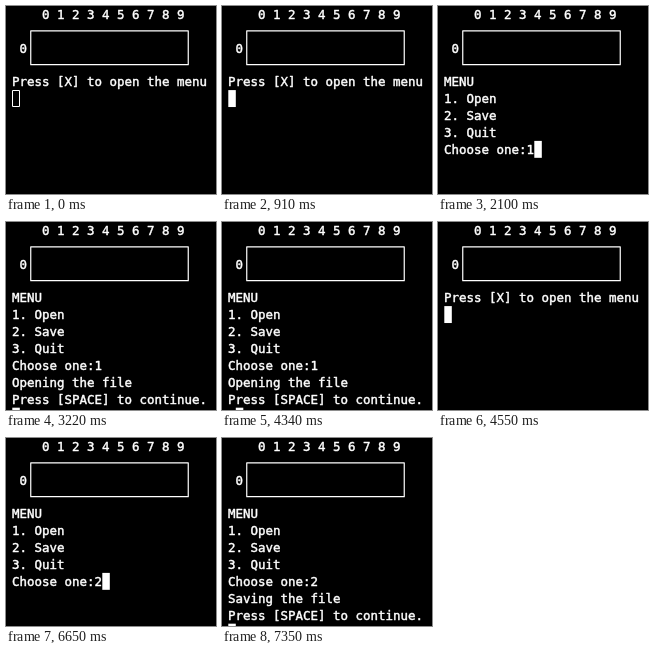
An HTML page with a canvas for the animation above (8000 ms loop, 210x188 px).

```html
<!DOCTYPE html>
<html lang="en">
<head>
<meta charset="utf-8">
<title>Terminal menu</title>
<style>
  html, body { margin: 0; width: 100%; height: 100%; overflow: hidden; background: #000; }
  canvas { display: block; width: 210px; height: 188px; }
</style>
</head>
<body>
<canvas id="stage" width="210" height="188"></canvas>
<script>
const ctx = document.getElementById('stage').getContext('2d');
const LOOP = 8000;
const LEFT = 6, TOP = -0.55, CELL = 7.5, LINE = 16.93, BASE = 13.2;
const FIRST_ROW = 4;

const prompt = ['Press [X] to open the menu', ''];
const menu = choice => ['MENU', '1. Open', '2. Save', '3. Quit', 'Choose one:' + choice];
const result = (choice, message, typed = '') =>
  [...menu(choice), message, 'Press [SPACE] to continue.', typed];

// The cursor sits after the last line; it is hollow while the window is unfocused.
const steps = [
  { at: 0, lines: prompt, hollow: true },
  { at: 490, lines: prompt },
  { at: 840, lines: prompt, hollow: true },
  { at: 910, lines: prompt },
  { at: 980, lines: menu('') },
  { at: 2100, lines: menu('1') },
  { at: 3220, lines: result('1', 'Opening the file') },
  { at: 4340, lines: result('1', 'Opening the file', ' ') },
  { at: 4550, lines: prompt },
  { at: 6020, lines: menu('') },
  { at: 6650, lines: menu('2') },
  { at: 7350, lines: result('2', 'Saving the file') }
];

const colX = col => LEFT + col * CELL;
const rowY = row => TOP + row * LINE;

// A thin outline gives the heavier stems of a smoothed terminal font.
function print(text, col, row) {
  const x = colX(col), y = Math.round(rowY(row) + BASE);
  ctx.lineWidth = 0.45;
  ctx.fillText(text, x, y);
  ctx.strokeText(text, x, y);
}

function drawTable() {
  print('0 1 2 3 4 5 6 7 8 9', 4, 0);
  print('0', 1, 2);
  ctx.lineWidth = 1.2;
  ctx.strokeRect(colX(2.5), rowY(1.5), 21 * CELL, 2 * LINE);
}

function drawCursor(col, row, hollow) {
  const x = colX(col), y = rowY(row);
  if (hollow) {
    ctx.lineWidth = 1;
    ctx.strokeRect(Math.floor(x) + 0.5, Math.floor(y) + 0.5, 7, 16);
  } else {
    ctx.fillRect(x + 0.3, y, CELL, LINE);
  }
}

function draw(now) {
  const time = now % LOOP;
  const { lines, hollow } = steps.findLast(step => step.at <= time);
  ctx.fillStyle = '#000';
  ctx.fillRect(0, 0, 210, 188);
  ctx.fillStyle = ctx.strokeStyle = '#fff';
  ctx.font = '12.46px "DejaVu Sans Mono", monospace';
  ctx.lineJoin = 'round';
  drawTable();
  lines.forEach((line, i) => print(line, 0, FIRST_ROW + i));
  const last = lines.length - 1;
  drawCursor(lines[last].length, FIRST_ROW + last, hollow);
}

const start = performance.now();
function tick() {
  draw(performance.now() - start);
  requestAnimationFrame(tick);
}
tick();
</script>
</body>
</html>
```
